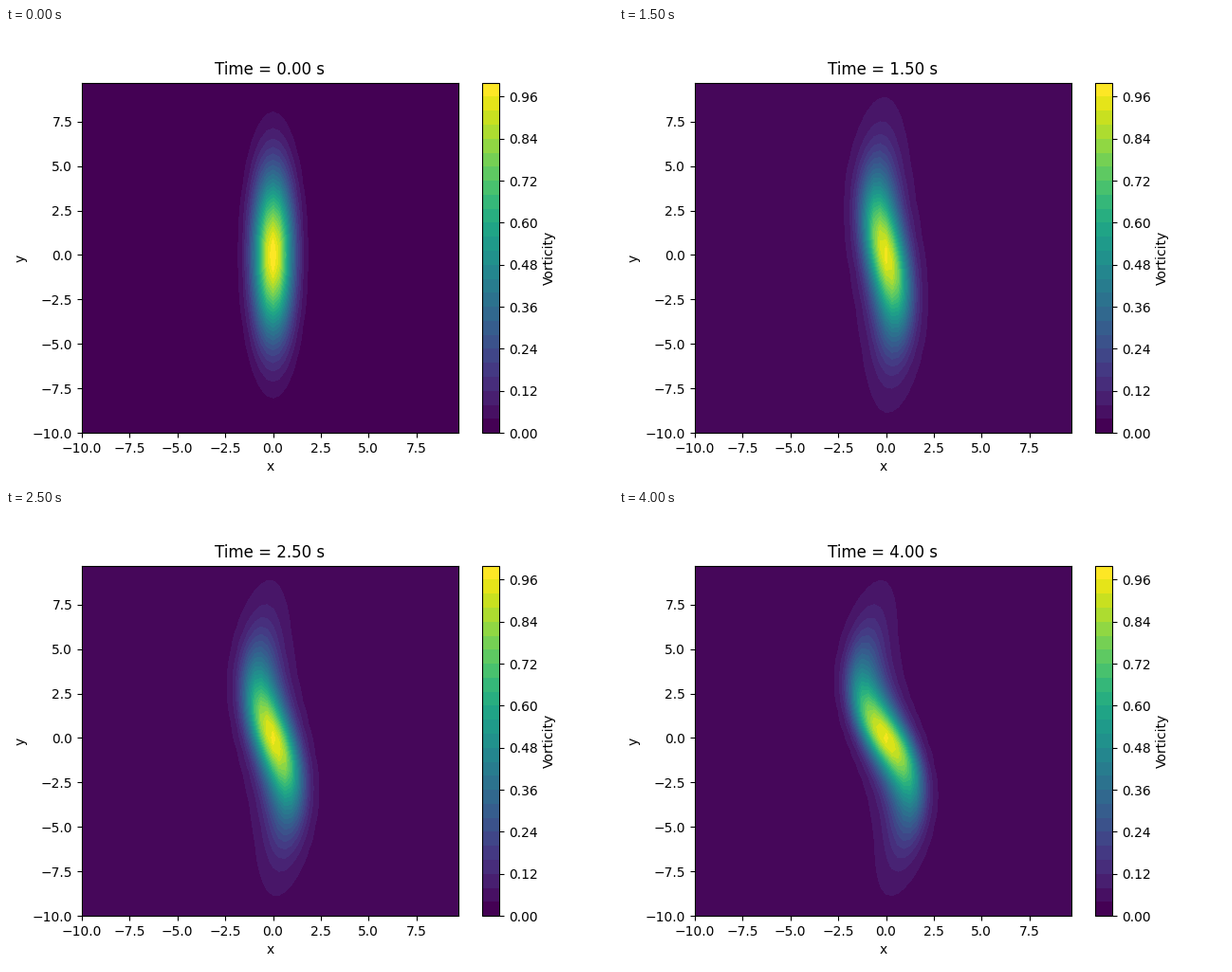
A matplotlib script for the animation above (4500 ms loop, 640 by 480 pixels).

```python
import numpy as np
import matplotlib.pyplot as plt
from matplotlib.animation import FuncAnimation

N, SIZE = 64, 20.0
FRAMES, DT, SUBSTEPS = 9, 0.5, 20

axis = np.linspace(-SIZE / 2, SIZE / 2, N, endpoint=False)
X, Y = np.meshgrid(axis, axis)

# Spectral solver for the 2D Euler equations in a periodic box
k = 2 * np.pi * np.fft.fftfreq(N, d=SIZE / N)
KX, KY = np.meshgrid(k, k)
K2 = KX**2 + KY**2
K2[0, 0] = 1.0
KEEP = (np.abs(KX) < 2 / 3 * k.max()) & (np.abs(KY) < 2 / 3 * k.max())


def real(f_hat):
    return np.fft.ifft2(f_hat).real


def rate(w_hat):
    psi = w_hat / K2
    u, v = real(1j * KY * psi), real(-1j * KX * psi)
    advection = u * real(1j * KX * w_hat) + v * real(1j * KY * w_hat)
    return -np.fft.fft2(advection) * KEEP


def rk4(w_hat, h):
    a = rate(w_hat)
    b = rate(w_hat + h / 2 * a)
    c = rate(w_hat + h / 2 * b)
    d = rate(w_hat + h * c)
    return w_hat + h / 6 * (a + 2 * b + 2 * c + d)


def simulate():
    w = np.exp(-(X**2 + Y**2 / 20))
    fields = [w]
    w_hat = np.fft.fft2(w)
    for _ in range(FRAMES - 1):
        for _ in range(SUBSTEPS):
            w_hat = rk4(w_hat, DT / SUBSTEPS)
        fields.append(real(w_hat))
    return fields


fields = simulate()
fig, ax = plt.subplots(figsize=(6.4, 4.8), dpi=100)


def fill(i):
    if i == 0:
        levels, lo, hi = np.linspace(0, 1, 26), 0.02, 0.98
    else:
        levels, lo, hi = np.linspace(-0.02, 1.02, 27), -0.02, 1.02
    return ax.contourf(X, Y, fields[i], levels=levels, vmin=lo, vmax=hi,
                       cmap="viridis")


contour = fill(0)
fig.colorbar(contour, ax=ax, label="Vorticity")
ax.set_xlabel("x")
ax.set_ylabel("y")
title = ax.set_title("Time = 0.00 s")


def update(i):
    global contour
    contour.remove()
    contour = fill(i)
    title.set_text(f"Time = {i * DT:.2f} s")
    return [title]


anim = FuncAnimation(fig, update, frames=FRAMES, interval=500,
                     init_func=lambda: [title], repeat=True,
                     repeat_delay=0, blit=False)
plt.show()
```
